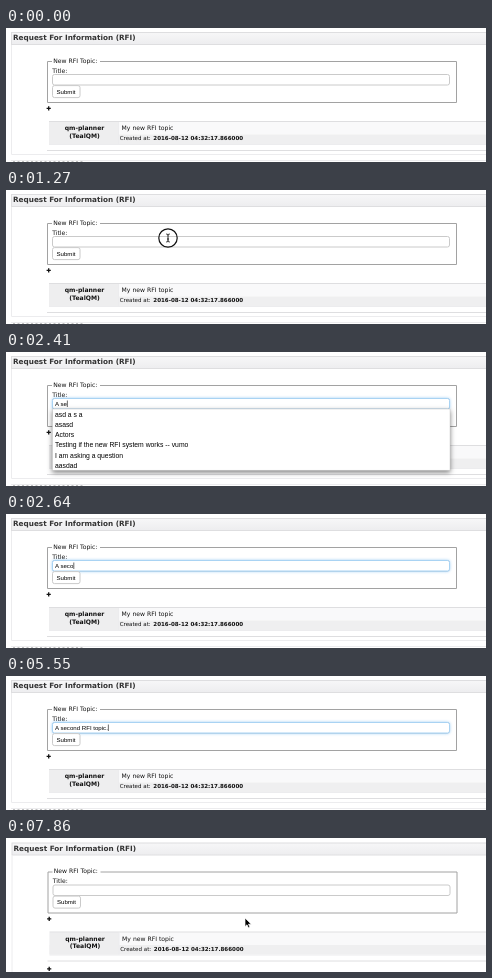
Write an HTML page that moves like this. It is 480 px wide and 134 px high and loops after 8000 ms.

```html
<!DOCTYPE html>
<html lang="en">
<head>
<meta charset="utf-8">
<title>Request form</title>
<style>
  html, body { margin: 0; width: 100%; height: 100%; overflow: hidden; background: #fff; }
  svg { display: block; width: 480px; height: 134px; }
  text { font: 6.1px "DejaVu Sans", Verdana, sans-serif; fill: #111; white-space: pre; }
  .bold { font-weight: bold; }
  .heading { font-size: 7.27px; fill: #333; }
  .small { font-size: 5.52px; }
  .ui { font-family: "Liberation Sans", Arial, sans-serif; fill: #000; }
  .option { font-size: 6.8px; }
  .line { stroke: #dedee0; fill: none; }
  .pale { stroke: #ececee; fill: none; }
  .box { fill: #fff; stroke: #cacaca; }
  #glow { fill: #fff; stroke: #a9d3f3; filter: drop-shadow(0 0 1.6px rgba(82, 168, 236, .55)); }
  #list rect { fill: #fff; stroke: #c8c8c8; stroke-width: .5; filter: drop-shadow(0 2px 2.5px rgba(0, 0, 0, .5)); }
</style>
</head>
<body>
<svg viewBox="0 0 480 134">
  <defs>
    <linearGradient id="bar" x2="0" y2="1">
      <stop stop-color="#f7f7f8"/><stop offset="1" stop-color="#ededef"/>
    </linearGradient>
  </defs>
  <g id="page">
    <rect x="5.5" y="4.5" width="480" height="12" fill="url(#bar)" stroke="#dedee0"/>
    <text class="bold heading" x="7" y="12.1">Request For Information (RFI)</text>

    <path d="M46 33.5H41.5V74.5H450.5V33.5H94" fill="none" stroke="#a2a2a2"/>
    <text x="47.3" y="34.9">New RFI Topic:</text>
    <text x="46.2" y="44.9">Title:</text>
    <rect class="box" x="46.5" y="46.5" width="397" height="10.5" rx="2"/>
    <rect id="glow" x="46.5" y="46.5" width="397" height="10.5" rx="2"/>
    <text id="entry" class="ui" x="49" y="53.6"></text>
    <path id="caret" d="M.5 48.5V55" stroke="#000" stroke-width=".6"/>
    <rect class="box" x="46.5" y="57.6" width="27.5" height="12" rx="2"/>
    <text class="ui" x="50.5" y="65.8">Submit</text>
    <path class="plus" d="M40.6 80.3H44.8M42.7 78.2V82.4" stroke="#111" stroke-width="1.3"/>

    <rect x="43" y="94" width="437" height="12.5" fill="#f9f9fa"/>
    <rect x="43" y="106.5" width="437" height="9.5" fill="#efeff0"/>
    <rect x="43" y="94" width="69.5" height="22" fill="#eeeeef"/>
    <path class="line" d="M43 93.5H480"/>
    <path class="pale" d="M43 116.5H480M112.5 94V116"/>
    <text class="bold" x="78.5" y="102.4" text-anchor="middle">qm-planner</text>
    <text class="bold" x="78.5" y="109.9" text-anchor="middle">(TealQM)</text>
    <text x="115.6" y="102.1">My new RFI topic</text>
    <text class="small" x="113.7" y="112.2">Created at:</text>
    <text class="small bold" x="147.3" y="112.2">2016-08-12 04:32:17.866000</text>
    <path class="line" d="M41 122.5H480"/>

    <g id="sectionEnd">
      <path class="pale" d="M5.5 17V126.5H480M5 132.5H480"/>
      <path d="M7 133.6H77" stroke="#aaa" stroke-width=".8" stroke-dasharray="2 2.5"/>
    </g>
    <g id="nextEntry">
      <path class="pale" d="M5.5 17V134"/>
      <path d="M40.6 130.3H44.8M42.7 128.2V132.4" stroke="#111" stroke-width="1.3"/>
    </g>
  </g>
  <g id="list"><rect x="46.5" y="57" width="397.5"/></g>
  <g id="cursor">
    <path id="arrow" d="M0 0V8.6L2 6.8L3.4 9.8L4.9 9.1L3.5 6.2H6.3Z" stroke="#fff" stroke-width=".7"/>
    <g id="hand" fill="#fff" stroke="#222" stroke-width=".7">
      <path d="M-.8 .6Q0-.6 .8 .6V3.4Q1.8 2.8 2.4 3.8Q3.4 3.2 4 4.2Q5.2 4 5.2 5.4Q5.2 7.6 4.2 9.2H.2L-2.6 5.6Q-2.4 4.2-.8 5.6Z"/>
      <path d="M1.2 6V8M2.7 6V8" stroke-width=".5"/>
    </g>
    <g id="beam" fill="none" stroke="#111">
      <path d="M-1.8-4Q0-4 0-2.8Q0-4 1.8-4M0-3V3M-1.8 4Q0 4 0 2.8Q0 4 1.8 4M-1 1H1" stroke-width=".9"/>
      <circle id="ring" r="9.2" stroke-width="1.2"/>
    </g>
  </g>
</svg>
<script>
const DURATION = 8000, FPS = 22;
const $ = id => document.getElementById(id);
const show = (id, visible) => { $(id).style.display = visible ? "" : "none"; };
const within = (t, from, to) => t >= from && t < to;

// Contents of the field from each time on
const typing = [
  [0, ""], [1910, "A"], [2180, "A "], [2270, "A s"], [2410, "A se"], [2590, "A sec"],
  [2640, "A seco"], [2770, "A secon"], [2860, "A second"], [3140, "A second "],
  [3360, "A second R"], [3590, "A second RF"], [3680, "A second RFI"], [3770, "A second RFI "],
  [4180, "A second RFI T"], [4590, "A second RFI "], [4730, "A second RFI t"],
  [4820, "A second RFI to"], [4950, "A second RFI top"], [5180, "A second RFI topi"],
  [5270, "A second RFI topic"], [5550, "A second RFI topic."], [7820, ""]
];
const pointerPath = [
  [360, 218, 117], [910, 158, 40], [1050, 158, 40], [1230, 162, 48], [1320, 162, 48],
  [1410, 163, 54], [7320, 163, 54], [7590, 187, 94.5], [7860, 239, 80]
];
const suggestions = ["asd a s a", "asasd", "Actors",
  "Testing if the new RFI system works -- vumo", "I am asking a question", "aasdad"];
const ROW = 10.2;

const options = suggestions.map((label, i) => {
  const node = document.createElementNS("http://www.w3.org/2000/svg", "text");
  node.setAttribute("class", "ui option");
  node.setAttribute("x", 49);
  node.setAttribute("y", 64.7 + i * ROW);
  node.textContent = label;
  return $("list").appendChild(node);
});

function pointerAt(t) {
  const next = pointerPath.findIndex(p => p[0] > t);
  if (next < 0) return pointerPath.at(-1).slice(1);
  if (next === 0) return pointerPath[0].slice(1);
  const [t0, x0, y0] = pointerPath[next - 1], [t1, x1, y1] = pointerPath[next];
  const u = (t - t0) / (t1 - t0), e = u * u * (3 - 2 * u);
  return [x0 + (x1 - x0) * e, y0 + (y1 - y0) * e];
}

function drawForm(t, submitted) {
  const entry = typing.findLast(([start]) => t >= start)[1];
  if ($("entry").textContent !== entry) $("entry").textContent = entry;
  $("glow").style.opacity = submitted ? 0 : Math.max(0, Math.min(1, (t - 1300) / 110));

  const caretOn = within(t, 1410, 6140) || within(t, 6680, 7320);
  show("caret", caretOn);
  const width = entry ? $("entry").getComputedTextLength() : 0;
  $("caret").setAttribute("transform", `translate(${49 + width})`);

  const rows = t < 2450 ? suggestions.length : 1;
  show("list", within(t, 1950, 2590));
  $("list").style.opacity = t < 2000 ? .6 : 1;
  $("list").firstElementChild.setAttribute("height", rows * ROW);
  options.forEach((node, i) => { node.style.display = i < rows ? "" : "none"; });
}

function drawPointer(t) {
  const [x, y] = pointerAt(Math.floor((t + 3) * FPS / 1000) * 1000 / FPS);
  const shape = y < 53 ? "beam" : y > 93 && y < 107 ? "hand" : "arrow";
  show("cursor", within(t, 360, 1910) || t >= 7320);
  for (const id of ["arrow", "hand", "beam"]) show(id, id === shape);
  show("ring", within(t, 1220, 1320));
  $("cursor").setAttribute("transform", `translate(${x} ${y})`);
}

function draw(now) {
  const t = now % DURATION, submitted = t >= 7820;
  $("page").setAttribute("transform", submitted ? "translate(.5 .5)" : "");
  show("sectionEnd", !submitted);
  show("nextEntry", submitted);
  drawForm(t, submitted);
  drawPointer(t);
  requestAnimationFrame(draw);
}
requestAnimationFrame(draw);
</script>
</body>
</html>
```
